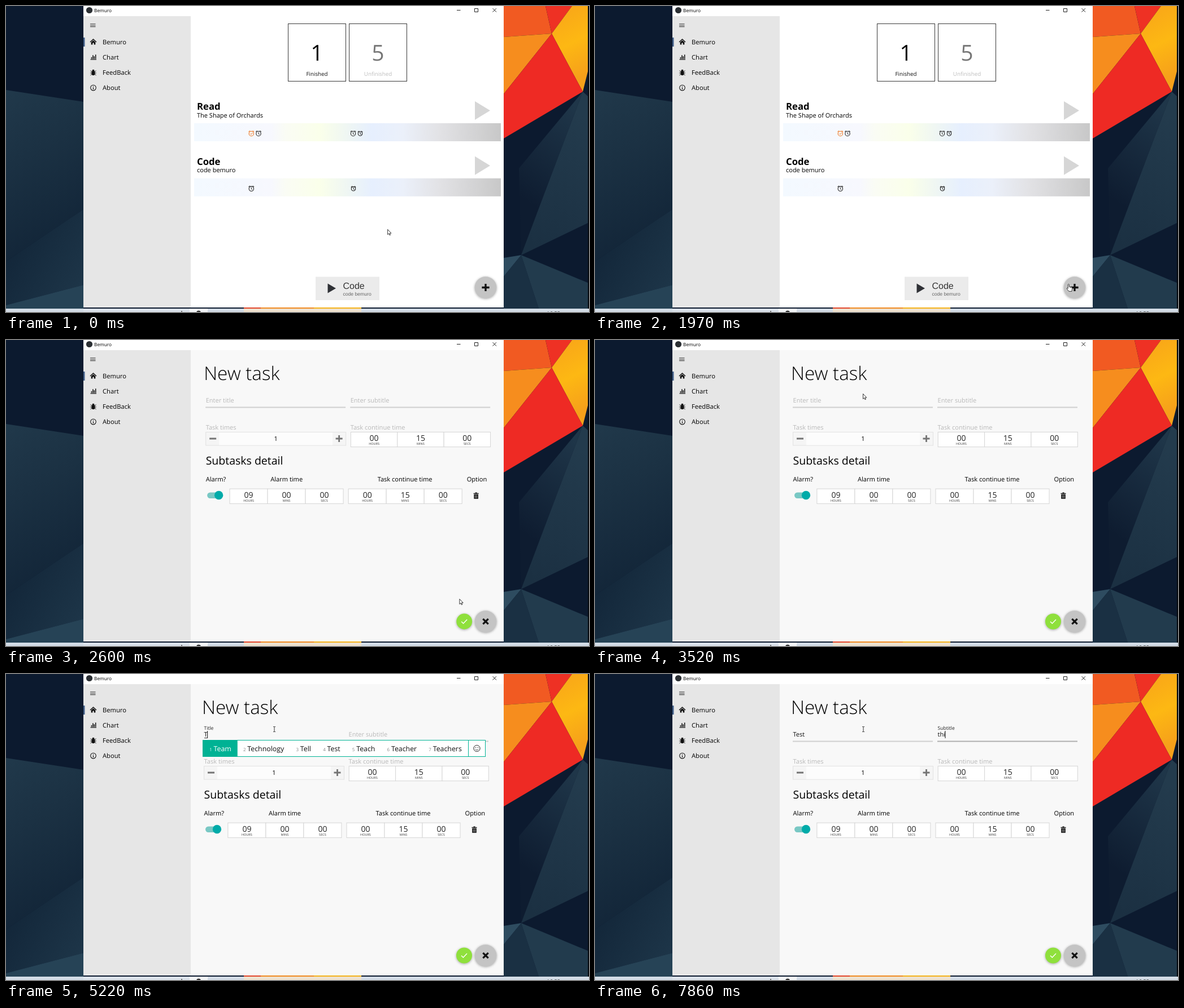
These frames come from a looping animation (1032 px wide and 543 px high, 8 s). An HTML page:

```html
<!DOCTYPE html>
<html lang="en">
<head>
<meta charset="utf-8">
<title>New task</title>
<style>
html, body { margin: 0; width: 100%; height: 100%; overflow: hidden; background: #0c1a2f; }
svg { display: block; width: 1032px; height: 543px; }
text { font-family: "Open Sans", "Noto Sans", sans-serif; text-rendering: geometricPrecision; }
.arial { font-family: "Liberation Sans", Arial, sans-serif; }
.shadow { filter: drop-shadow(0 1.5px 2px rgba(0, 0, 0, .35)); }
</style>
</head>
<body>
<svg id="stage" viewBox="0 0 1032 543" xmlns="http://www.w3.org/2000/svg"></svg>
<script>
const LOOP = 8000;
const stage = document.getElementById('stage');
const $ = id => document.getElementById(id);

// ---------- markup helpers ----------
const text = (x, y, size, str, attrs = '') => `<text x="${x}" y="${y}" font-size="${size}" ${attrs}>${str}</text>`;
const mid = (x, y, size, str, attrs = '') => text(x, y, size, str, 'text-anchor="middle" ' + attrs);
const rect = (x, y, w, h, fill, attrs = '') => `<rect x="${x}" y="${y}" width="${w}" height="${h}" fill="${fill}" ${attrs}/>`;
const poly = (points, fill) => `<polygon points="${points}" fill="${fill}"/>`;
const path = (d, attrs) => `<path d="${d}" ${attrs}/>`;
const line = (d, color, width, attrs = '') => path(d, `fill="none" stroke="${color}" stroke-width="${width}" ${attrs}`);
const circle = (x, y, r, attrs) => `<circle cx="${x}" cy="${y}" r="${r}" ${attrs}/>`;
const group = (x, y, inner, attrs = '') => `<g transform="translate(${x} ${y})" ${attrs}>${inner}</g>`;
const gradient = (id, x1, y1, x2, y2, stops) =>
  `<linearGradient id="${id}" gradientUnits="userSpaceOnUse" x1="${x1}" y1="${y1}" x2="${x2}" y2="${y2}">` +
  stops.map(([o, c]) => `<stop offset="${o}" stop-color="${c}"/>`).join('') + '</linearGradient>';

const defs = `<defs>
${gradient('day', 333, 0, 876, 0, [[0, '#f3f9ff'], [.25, '#f7f8fe'], [.3, '#fafcf4'], [.41, '#faffea'],
  [.49, '#f0f7f2'], [.58, '#e6effe'], [.68, '#ebf0fa'], [.8, '#e2e2e5'], [1, '#c8c8c8']])}
${gradient('slateL', 0, 160, 137, 400, [[0, '#20384a'], [.4, '#1b3143'], [1, '#122538']])}
${gradient('slateB', 0, 453, 120, 520, [[0, '#13273a'], [1, '#1d3548']])}
${gradient('slateR', 1030, 200, 920, 420, [[0, '#233b4d'], [1, '#1b3042']])}
${gradient('slateM', 1010, 180, 900, 330, [[0, '#1f3649'], [1, '#0e1c30']])}
${gradient('sun', 975, 10, 1030, 120, [[0, '#f9a718'], [.5, '#fdb813'], [1, '#f6a01a']])}
<clipPath id="window"><rect x="327" y="18" width="554" height="517"/></clipPath>
</defs>`;

// ---------- desktop ----------
const desktop = rect(0, 0, 1032, 543, '#0c1a2f')
  + poly('0,149 137,170 137,361 0,453', 'url(#slateL)')
  + poly('0,453 137,361 137,495 0,531', 'url(#slateB)')
  + poly('0,531 137,495 137,543 0,543', '#264356')
  + poly('881,0 955,0 966,49 881,55', '#f15a22')
  + poly('955,0 1002,0 966,49', '#ee3124')
  + poly('1002,0 1032,0 1032,108 1021,152 966,49', 'url(#sun)')
  + poly('881,55 966,49 881,156', '#f68d1e')
  + poly('966,49 1021,152 881,235 881,156', '#ee2a24')
  + poly('1021,152 908,288 912,442', 'url(#slateM)')
  + poly('1021,152 1032,162 1032,384 912,442', 'url(#slateR)')
  + poly('881,447 912,442 881,480', '#2e4c60')
  + poly('881,480 912,442 945,543 881,543', '#1a3043')
  + poly('912,442 1032,492 1032,543 945,543', '#223b4d')
  + rect(1030, 0, 2, 537, '#05090f')
  + rect(421, 535, 30, 2, '#e2452a') + rect(451, 535, 94, 2, '#f08a20') + rect(545, 535, 84, 2, '#f5b21a')
  + rect(0, 537, 1032, 6, '#d3dce6') + rect(137, 537, 188, 6, '#dbe2ea')
  + rect(325, 537, 32, 6, '#f4f6f8') + rect(421, 537, 208, 6, '#eee2cf')
  + path('M337 543 a4.5 4.5 0 0 1 8 0 Z', 'fill="#333"') + rect(310, 541, 2, 2, '#777')
  + text(957, 549, 9.5, '16:32', 'fill="#222"');

// ---------- window chrome ----------
const titleBar = rect(137, 0, 744, 18, '#fff') + circle(147.5, 7.5, 5.6, 'fill="#2b2f33"')
  + text(156, 10.8, 8.3, 'Bemuro')
  + line('M798 7.5h6.5M829.5 4.5h6v6h-6zM861.5 4.2l6.5 6.5M868 4.2l-6.5 6.5', '#222', 1);

const menu = [
  ['Bemuro', line('M-5.5 .5L0 -4.5L5.5 .5', '#111', 1.5) + path('M-3.8 .8L0 -2.6L3.8 .8V5H1.2V2H-1.2V5H-3.8Z', 'fill="#111"')],
  ['Chart', line('M-5 4.2H5.5', '#111', 1.2) + line('M-3 3V0M-.6 3V-3.5M1.8 3V-1.5M4.2 3V-4.5', '#111', 1.5)],
  ['FeedBack', `<ellipse cy="1" rx="3" ry="4.2" fill="#111"/>` + circle(0, -3.2, 2, 'fill="#111"')
    + line('M-5 -3L-2 -1M5 -3L2 -1M-5.3 1H5.3M-5 5L-2 2.5M5 5L2 2.5', '#111', 1)],
  ['About', circle(0, 0, 4.8, 'fill="none" stroke="#111" stroke-width="1.1"') + line('M0 -2.8V-1.5M0 -.5V2.8', '#111', 1.2)]
];
const sidebar = rect(137, 18, 190, 517, '#e6e6e6') + rect(137, 56, 2.5, 16, '#44618c')
  + line('M149 31.8h9.5M149 34.2h9.5M149 36.6h9.5', '#444', 1.1)
  + menu.map(([label, icon], i) => group(154.5, 63.5 + i * 27.2, icon) + text(171, 67.8 + i * 27.2, 11.2, label)).join('');

// ---------- task list ----------
const alarm = (x, y, r, color, done) => group(x, y,
  circle(0, .5, r, `fill="none" stroke="${color}" stroke-width="1.1"`)
  + line(`M${-r - .6} ${-r + 1.6}L${-r + 1.8} ${-r - .5}M${r + .6} ${-r + 1.6}L${r - 1.8} ${-r - .5}`, color, 1.1)
  + line(done ? 'M-2 .6L-.5 2L2.2 -1' : 'M0 -2V.8L1.8 2', color, 1));

const row = (y, title, sub, alarms) => text(338, y + 184, 16.7, title, 'font-weight="700"')
  + text(338, y + 197.5, 11, sub)
  + poly(`830,${y + 169} 857,${y + 185.5} 830,${y + 202}`, '#d6d6d6')
  + rect(333, y + 208, 543, 32, 'url(#day)')
  + alarms.map(([x, r, done]) => alarm(x, y + 226, r, done ? '#ee7621' : '#222', done)).join('');

const counter = (x, num, label, numColor, labelColor) =>
  rect(x, 31.5, 102, 102, '#fff', 'stroke="#3a3a3a"')
  + mid(x + 51, 97, 39, num, `fill="${numColor}"`) + mid(x + 51, 123.6, 9.75, label, `fill="${labelColor}"`);

const list = counter(499.5, 1, 'Finished', '#000', '#111') + counter(607.5, 5, 'Unfinished', '#777', '#bdbdbd')
  + row(0, 'Read', 'The Shape of Orchards', [[434.3, 4.2, 1], [447, 4.2], [614.5, 4.2], [627, 3.7]])
  + row(97.8, 'Code', 'code bemuro', [[434.3, 4.2], [615, 3.7]])
  + rect(548, 480.5, 113, 41.5, '#ebebeb') + poly('569.5,492.5 584,501 569.5,509.5', '#2f3136')
  + text(596.5, 502, 16, 'Code', 'class="arial" fill="#333"')
  + text(596.5, 514.4, 8.6, 'code bemuro', 'class="arial" fill="#666"');

// ---------- new task form ----------
const GREY = '#b9b9b9';
const clock = (x, y, w, values) => values.map((v, i) => {
  const cx = x + w * (i + .5);
  return rect(x + w * i, y, w, 26.3, '#fff', 'stroke="#d5d5d5"')
    + mid(cx, y + 15.8, 14, v, 'fill="#222"')
    + mid(cx, y + 23, 5.5, ['HOURS', 'MINS', 'SECS'][i], 'fill="#333"');
}).join('');

const field = (id, x, hint, label) => text(x, 111.3, 11.05, hint, `id="${id}Hint" fill="${GREY}"`)
  + text(x, 99.3, 8.55, label, `id="${id}Label" fill="#222"`)
  + text(x, 111.3, 11.05, '', `id="${id}Text" fill="#111"`)
  + rect(x - .5, 118.5, 248, 2, '#d0d0d0', `id="${id}Line"`)
  + rect(x, 101, 1, 13, '#111', `id="${id}Caret"`);

const form = rect(323, 18, 558, 517, '#f8f8f8')
  + text(347, 71, 33.2, 'New task', 'font-weight="300"')
  + field('title', 350.5, 'Enter title', 'Title') + field('sub', 606.5, 'Enter subtitle', 'Subtitle')
  + text(350.5, 158.5, 11.1, 'Task times', `fill="${GREY}"`) + text(606.5, 158.5, 11.1, 'Task continue time', `fill="${GREY}"`)
  + rect(350.5, 163.5, 248, 23.5, '#f5f5f5', 'stroke="#e2e2e2"') + rect(374, 164, 201, 22.5, '#fcfcfc')
  + line('M357 175H369M580.5 175H592.5M586.5 169V181', '#747474', 2.8)
  + mid(474.5, 179, 11.1, 1) + clock(607.2, 163.4, 82.4, ['00', '15', '00'])
  + text(350.5, 221, 19.5, 'Subtasks detail')
  + text(350.5, 251, 11.1, 'Alarm?') + text(465, 251, 11.1, 'Alarm time')
  + text(654.5, 251, 11.1, 'Task continue time') + text(812.5, 251, 11.1, 'Option')
  + rect(353, 270.5, 25, 10.5, '#79c8c4', 'rx="5.2"') + circle(373.5, 275.5, 7.7, 'fill="#00aba9"')
  + clock(392.9, 264.1, 67, ['09', '00', '00']) + clock(603, 264.1, 67, ['00', '15', '00'])
  + line('M824.5 272.5H833.5M827.5 271.3H830.5', '#111', 1.4) + path('M825.2 274H832.8V281.8H825.2Z', 'fill="#111"')
  + line('M827.3 275.3V280.5M829 275.3V280.5M830.7 275.3V280.5', '#ddd', .6);

const buttons = `<g id="ok"><g class="shadow">${circle(0, 0, 14, 'fill="#8fe03c"')}</g>${line('M-5 .2L-1.7 3.4L5 -3.6', '#fff', 1.4)}</g>`
  + circle(849, 499.5, 19.3, 'fill="#c4c4c4" class="shadow"')
  + `<g id="plus">${line('M-6.6 0H6.6M0 -6.6V6.6', '#111', 3.3)}</g>`;

const cursors = `<g id="arrow">${path('M.5 .5V9.6L2.6 7.7L4 10.8L5.4 10.2L4 7.2H6.8Z', 'fill="#fff" stroke="#222" stroke-width=".9"')}</g>`
  + `<g id="hand">${path('M.3 1.6Q1.4 .2 2.4 1.6V5.6L6.8 6.4Q8 6.8 7.8 8.4L7 13.8H1.8L-1.8 9.2Q-2 7.6 -.6 8L.3 8.8Z',
    'fill="#fff" stroke="#222" stroke-width=".9"') + line('M4 6.2V8M5.8 6.5V8', '#222', .6)}</g>`
  + `<g id="beam">${line('M-2 -4.5H-.5L0 -4L.5 -4.5H2M0 -4V4M-2 4.5H-.5L0 4L.5 4.5H2', '#222', .9)}</g>`;

stage.innerHTML = defs + desktop + rect(137, 0, 744, 535, '#fff') + titleBar + list
  + `<g clip-path="url(#window)"><g id="drawer">${form}</g></g>` + sidebar + buttons
  + rect(351, 113, 1, 1, '#333', 'id="compose"') + '<g id="ime"></g>' + cursors;

// ---------- word suggestions ----------
const ime = $('ime');
const TEAL = '#00b294';
const width = (str, size) => {
  ime.innerHTML = text(0, 0, size, str);
  return ime.firstChild.getComputedTextLength();
};
function popup(words) {
  let x = 361, labels = '', first = 0;
  words.forEach((word, i) => {
    const end = x + 7 + width(word, 12.37);
    labels += text(x - .8, 136.6, 8, i + 1, `fill="${i ? '#888' : '#d8f5ee'}"`)
      + text(x + 6.5, 136.6, 12.37, word, `fill="${i ? '#111' : '#fff'}"`);
    if (!i) first = end + 10.5;
    x = end + 21.5;
  });
  const sep = Math.round(x - 11) + .5;
  return rect(348.5, 117.5, sep + 30 - 348.5, 29, '#fff', `stroke="${TEAL}"`)
    + rect(348, 117, first - 348, 30, TEAL) + labels + line(`M${sep} 117V147`, TEAL, 1)
    + group(sep + 15, 132, circle(0, 0, 5.6, 'fill="none" stroke="#222"')
      + line('M-2.8 1.5Q0 4.6 2.8 1.5', '#222', .9) + circle(-2, -1.5, .8, 'fill="#222"') + circle(2, -1.5, .8, 'fill="#222"'));
}
const popups = [
  [0, ''],
  [4990, rect(348, 117, 60, 30, TEAL) + text(360.2, 136.6, 8, 1, 'fill="#d8f5ee"') + text(367.5, 136.6, 12.37, 'T', 'fill="#fff"')],
  [5220, popup(['Team', 'Technology', 'Tell', 'Test', 'Teach', 'Teacher', 'Teachers'])],
  [5450, popup(['Test', 'Tests', 'Testing', 'Tested', 'Testers', 'Testament', 'Testify'])],
  [5780, popup(['Test', 'Testing', 'Tests', 'Tested', 'Tester', 'Testament', 'Testable'])],
  [6160, '']
];
ime.innerHTML = popups.map(p => `<g>${p[1]}</g>`).join('');

// ---------- timeline ----------
const titleKeys = [[0, ''], [4990, 'T'], [5300, 'Te'], [5450, 'Tes'], [5780, 'Test']];
const subKeys = [[0, ''], [7560, 't'], [7860, 'thi']];
const pointer = [[0, 675, 396], [810, 766, 394], [1250, 781, 412], [1500, 800, 442], [1660, 815, 482],
  [1740, 828, 490], [1900, 837, 492.5], [2560, 837, 492.5], [2830, 609, 273], [3060, 609, 273],
  [3450, 476, 90], [3520, 474, 95], [3750, 475, 98]];

const between = (t, a, b) => t >= a && t < b;
const ramp = (t, a, b) => Math.min(1, Math.max(0, (t - a) / (b - a)));
const stepIndex = (keys, t) => keys.filter(k => k[0] <= t).length - 1;
const show = (el, on) => el.setAttribute('visibility', on ? 'visible' : 'hidden');
const move = (id, x, y, extra = '') => $(id).setAttribute('transform', `translate(${x} ${y}) ${extra}`);

// cubic-bezier(.4, 0, .2, 1)
function ease(x) {
  let lo = 0, hi = 1, s = .5;
  for (let i = 0; i < 20; i++) {
    s = (lo + hi) / 2;
    const q = 1 - s;
    if (1.2 * q * q * s + .6 * q * s * s + s ** 3 < x) lo = s; else hi = s;
  }
  return 3 * (1 - s) * s * s + s ** 3;
}

function pointerAt(t) {
  const i = stepIndex(pointer, t), a = pointer[i], b = pointer[i + 1] || a;
  const p = a === b ? 0 : ramp(t, a[0], b[0]);
  return [a[1] + (b[1] - a[1]) * p, a[2] + (b[2] - a[2]) * p];
}

function drawField(id, x, value, focus, hint, caret) {
  const label = $(id + 'Label'), txt = $(id + 'Text');
  if (txt.textContent !== value) txt.textContent = value;
  label.setAttribute('opacity', focus);
  label.setAttribute('y', 99.3 + 9 * (1 - focus));
  $(id + 'Hint').setAttribute('opacity', hint);
  const tone = Math.round(208 - 32 * focus);
  $(id + 'Line').setAttribute('fill', `rgb(${tone},${tone},${tone})`);
  const w = value ? txt.getComputedTextLength() : 0;
  $(id + 'Caret').setAttribute('x', x + w);
  show($(id + 'Caret'), caret);
  return w;
}

function draw(t) {
  const open = ease(ramp(t, 2340, 2630));
  move('drawer', 558 * (1 - open), 0);
  show($('drawer'), open > 0);
  move('plus', 849, 499.5, `rotate(${45 * open})`);
  move('ok', 849 - 38 * open, 499.5, `scale(${.3 + .7 * open})`);
  show($('ok'), open > 0);

  const rise = ease(ramp(t, 3720, 3990)), swap = ease(ramp(t, 6700, 7010));
  const title = titleKeys[stepIndex(titleKeys, t)][1];
  const w = drawField('title', 350, title, rise * (1 - swap), 1 - rise,
    between(t, 3830, 4210) || between(t, 4760, 6700));
  drawField('sub', 606, subKeys[stepIndex(subKeys, t)][1], swap, 1 - swap,
    between(t, 6700, 7240) || t >= 7560);

  $('compose').setAttribute('width', Math.max(0, w - .5));
  show($('compose'), between(t, 4990, 6320));
  const now = stepIndex(popups, t);
  [...ime.children].forEach((g, i) => show(g, i === now));

  const [x, y] = pointerAt(t);
  const shape = between(t, 1740, 2600) ? 'hand' : t >= 3750 ? 'beam' : 'arrow';
  for (const id of ['arrow', 'hand', 'beam']) {
    move(id, x, y);
    show($(id), id === shape);
  }
}

function tick() {
  draw(performance.now() % LOOP);
  requestAnimationFrame(tick);
}
tick();
</script>
</body>
</html>
```
